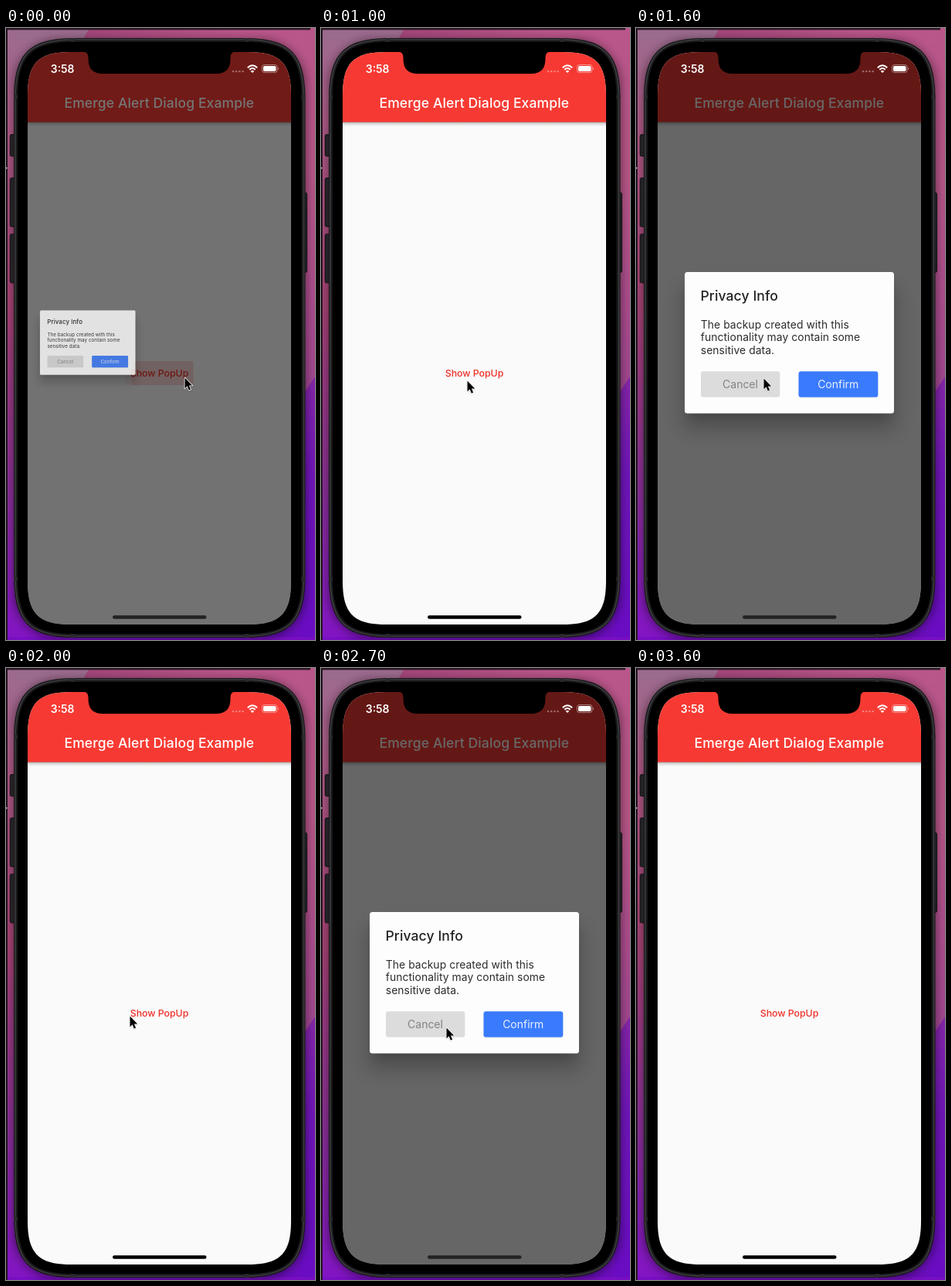
An HTML page for the animation above (4 s loop, 400 by 790 pixels).

```html
<!DOCTYPE html>
<html lang="en">
<head>
<meta charset="utf-8">
<title>Emerge Alert Dialog Example</title>
<style>
  html, body { margin: 0; width: 100%; height: 100%; overflow: hidden; background: #000; }
  svg { display: block; width: 400px; height: 790px; }
  text { font-family: Inter, Roboto, sans-serif; white-space: pre; }
  .title { font-size: 17.5px; font-weight: 500; letter-spacing: .13px; }
  .body { font-size: 13.8px; fill: #2b2b2b; letter-spacing: .1px; }
  .btn { font-size: 13.98px; text-anchor: middle; }
</style>
</head>
<body>
<svg viewBox="0 0 400 790">
  <defs>
    <linearGradient id="left" x2="0" y2="1">
      <stop offset="0" stop-color="#9a6c8e"/>
      <stop offset=".15" stop-color="#ad5a86"/>
      <stop offset=".45" stop-color="#a54373"/>
      <stop offset=".75" stop-color="#8a2f96"/>
      <stop offset="1" stop-color="#8214c4"/>
    </linearGradient>
    <linearGradient id="right" x2="0" y2="1">
      <stop offset="0" stop-color="#b9568a"/>
      <stop offset=".25" stop-color="#b45586"/>
      <stop offset=".6" stop-color="#a04690"/>
      <stop offset="1" stop-color="#6a0cc0"/>
    </linearGradient>
    <linearGradient id="top">
      <stop offset="0" stop-color="#a04478"/>
      <stop offset="1" stop-color="#b9568a"/>
    </linearGradient>
    <linearGradient id="purple" x2="0" y2="1">
      <stop offset="0" stop-color="#8526a8"/>
      <stop offset=".35" stop-color="#7016b8"/>
      <stop offset="1" stop-color="#690cc4"/>
    </linearGradient>
    <linearGradient id="barShadow" x2="0" y2="1">
      <stop offset="0" stop-opacity=".36"/>
      <stop offset=".4" stop-opacity=".14"/>
      <stop offset="1" stop-opacity="0"/>
    </linearGradient>
    <filter id="soft" x="-40%" y="-40%" width="180%" height="180%"><feGaussianBlur stdDeviation="13"/></filter>
    <filter id="tight" x="-20%" y="-20%" width="140%" height="140%"><feGaussianBlur stdDeviation="6"/></filter>
    <filter id="small" x="-50%" y="-50%" width="200%" height="200%"><feGaussianBlur stdDeviation="1"/></filter>
    <clipPath id="screen"><path id="screenShape"/></clipPath>
    <clipPath id="showBox"><rect x="155" y="430" width="87.5" height="31" rx="3"/></clipPath>
    <clipPath id="cancelBox"><rect x="84" y="443.3" width="102.3" height="33.3" rx="3"/></clipPath>
  </defs>

  <!-- Desktop -->
  <rect width="200" height="790" fill="url(#left)"/>
  <rect x="200" width="200" height="790" fill="url(#right)"/>
  <path d="M108 0H300V60H75Z" fill="url(#top)"/>
  <path d="M400 450V790H380V480Z" fill="url(#purple)"/>
  <rect y="786" width="400" height="4" fill="#780fc2"/>
  <rect x="9" y="14" width="380" height="776" rx="60" filter="url(#tight)" opacity=".4"/>
  <rect width="394" height="2.5" fill="#2b1824"/>
  <rect width="2" height="790" fill="#20121f"/>
  <rect y="180" width="1.5" height="1.500" fill="#ddd"/>

  <!-- Phone -->
  <g fill="#242226" stroke="#111" stroke-width="1">
    <rect x="5.300" y="137.500" width="7" height="28" rx="2"/>
    <rect x="5.300" y="193.500" width="7" height="63" rx="2"/>
    <rect x="5.300" y="266" width="7" height="63" rx="2"/>
    <rect x="383" y="212.500" width="6.500" height="103" rx="2"/>
  </g>
  <path id="body" fill="#19191b"/>
  <path id="rim" fill="none" stroke="#3e3d40" stroke-width="1.500"/>
  <path id="bezel"/>
  <path d="M10 89H15M382.500 89H387.500M10 711H15M382.500 711H387.500M86 13V18M312 13V18M86 782V787M312 782V787" stroke="#29292b" stroke-width="5"/>

  <!-- App -->
  <g clip-path="url(#screen)">
    <rect x="28" y="31" width="341" height="739" fill="#fafafa"/>
    <rect x="28" y="121" width="341" height="6" fill="url(#barShadow)"/>
    <rect x="28" y="31" width="341" height="90.500" fill="#f63a33"/>
    <text class="title" x="198.300" y="103" text-anchor="middle" fill="#fff">Emerge Alert Dialog Example</text>
    <g clip-path="url(#showBox)">
      <g id="showPress" fill="#f63a33">
        <rect x="155" y="430" width="88" height="31" fill-opacity=".06"/>
        <circle id="showSplash" r="69" fill-opacity=".14"/>
      </g>
    </g>
    <text x="198.500" y="449.700" text-anchor="middle" font-size="12.300" font-weight="500" fill="#ee3029">Show PopUp</text>
    <rect id="barrier" x="28" y="31" width="341" height="739"/>

    <g id="dialog">
      <rect x="60" y="334" width="277" height="185" rx="8" filter="url(#soft)" opacity=".22"/>
      <rect x="69" y="327" width="259" height="174" rx="6" filter="url(#tight)" opacity=".14"/>
      <rect x="63" y="315" width="271" height="182.500" rx="3.500" fill="#fdfdfd"/>
      <text class="title" x="83.500" y="352.300" fill="#222">Privacy Info</text>
      <text class="body" x="83.800" y="387.700">The backup created with this</text>
      <text class="body" x="83.800" y="404.200">functionality may contain some</text>
      <text class="body" x="83.800" y="420.800">sensitive data.</text>
      <rect x="84" y="443.300" width="102.300" height="33.300" rx="3" fill="#dcdcdc"/>
      <g clip-path="url(#cancelBox)">
        <g id="cancelPress">
          <rect x="84" y="443" width="103" height="34" fill-opacity=".03"/>
          <circle id="cancelSplash" r="18" fill-opacity=".07"/>
        </g>
      </g>
      <text class="btn" x="135" y="465" fill="#838383">Cancel</text>
      <rect x="210.500" y="443.800" width="102.800" height="33.500" rx="3" opacity=".12"/>
      <rect x="210.500" y="443.300" width="102.800" height="33.300" rx="3" fill="#3a7bfd"/>
      <text class="btn" x="261.700" y="465" fill="#eaf0ff">Confirm</text>
    </g>
    <rect id="home" x="138" y="758.300" width="121.500" height="4.500" rx="2.250"/>
  </g>

  <!-- Notch and status -->
  <path d="M100 30.500Q106.500 31 106.500 38V40Q106.500 59 125 59H272Q290.500 59 290.500 40V38Q290.500 31 297 30.500Z"/>
  <g fill="#fff">
    <text x="57.800" y="57.700" font-size="13.900" font-weight="600">3:58</text>
    <g opacity=".35">
      <circle cx="294" cy="56" r="1.300"/><circle cx="298.200" cy="56" r="1.300"/>
      <circle cx="302.400" cy="56" r="1.300"/><circle cx="306.600" cy="56" r="1.300"/>
    </g>
    <path d="M312.800 51.200Q319 45.200 325.200 51.200M315.300 53.800Q319 50.200 322.700 53.800" fill="none" stroke="#fff" stroke-width="2"/>
    <path d="M319 58L316.700 55.700Q319 53.800 321.300 55.700Z"/>
    <rect x="331.500" y="47.500" width="19.500" height="10" rx="3" fill="none" stroke="#fff" stroke-opacity=".45"/>
    <rect x="333" y="49" width="16.500" height="7" rx="1.700"/>
    <path d="M352 50.800Q354 52.500 352 54.200Z" opacity=".5"/>
  </g>

  <g id="cursor">
    <path d="M.5 1.500V15.300L3.600 12.300 5.800 17.500 8.100 16.500 5.900 11.500H10.200Z" filter="url(#small)" opacity=".3"/>
    <path d="M.5 .5V14.300L3.600 11.300 5.800 16.500 8.100 15.500 5.900 10.500H10.200Z" stroke="#fff" stroke-width="1.600" paint-order="stroke" stroke-linejoin="round"/>
  </g>
</svg>
<script>
  const LOOP = 4000, STEP = 100;
  const $ = id => document.getElementById(id);

  // Box with continuous corners, which start turning earlier than an arc.
  function smoothBox(id, x, y, w, h, r) {
    const e = 1.35 * r, c = .33 * r, X = x + w, Y = y + h;
    $(id).setAttribute('d', `M${x + e} ${y}H${X - e}
      C${X - c} ${y} ${X} ${y + c} ${X} ${y + e}V${Y - e}
      C${X} ${Y - c} ${X - c} ${Y} ${X - e} ${Y}H${x + e}
      C${x + c} ${Y} ${x} ${Y - c} ${x} ${Y - e}V${y + e}
      C${x} ${y + c} ${x + c} ${y} ${x + e} ${y}Z`);
  }
  smoothBox('screenShape', 28, 31, 341, 739, 42);
  smoothBox('body', 10, 13, 377.5, 774, 59);
  smoothBox('rim', 12, 15, 373.5, 770, 57);
  smoothBox('bezel', 15, 18, 367.5, 764, 54);

  // time, progress of the dialog
  const openKeys = [
    [0, .63], [100, 1], [800, 1], [900, .55], [1000, 0],
    [1300, 0], [1400, .63], [1500, 1], [1700, 1], [1800, .55], [1900, 0],
    [2400, 0], [2500, .63], [2600, 1], [2900, 1], [3000, .55], [3100, 0]
  ];
  // time, x, y
  const cursorKeys = [
    [0, 231, 451], [100, 231, 451], [600, 178, 456], [800, 178, 456],
    [1000, 189, 455], [1300, 189, 453], [1600, 165, 452], [1800, 165, 452],
    [2000, 160, 449], [2400, 165, 449], [2700, 162, 464], [3300, 162, 464]
  ];
  const showTimes = [0, 1300, 1400, 2400, 2500];
  const cancelTimes = [800, 900, 1700, 1800, 2900, 3000];

  function sample(keys, t) {
    const i = keys.findIndex(k => k[0] > t);
    if (i < 0) return keys[keys.length - 1].slice(1);
    const a = keys[i - 1], b = keys[i];
    const p = (t - a[0]) / (b[0] - a[0]);
    return a.slice(1).map((v, n) => v + (b[n + 1] - v) * p);
  }

  const easeOut = (v, power) => 1 - Math.pow(1 - v, power);

  function press(name, on, x, y) {
    $(name + 'Press').setAttribute('opacity', on ? 1 : 0);
    $(name + 'Splash').setAttribute('cx', x);
    $(name + 'Splash').setAttribute('cy', y);
  }

  function draw(t) {
    const [v] = sample(openKeys, t);
    const [x, y] = sample(cursorKeys, t);
    const s = Math.pow(v, 1.7);

    // The dialog grows out of the middle of the left screen edge.
    $('dialog').setAttribute('transform', `translate(28 406.2) scale(${s}) translate(-28 -406.2)`);
    $('dialog').setAttribute('opacity', easeOut(v, 1.67));
    $('dialog').setAttribute('visibility', v > 0 ? 'visible' : 'hidden');
    $('barrier').setAttribute('opacity', .592 * easeOut(v, 2.5));
    $('home').setAttribute('fill', v > 0 ? '#222' : '#000');

    press('show', showTimes.includes(t), x, y);
    press('cancel', cancelTimes.includes(t), x, y + 2);

    $('cursor').setAttribute('transform', `translate(${x} ${y})`);
    $('cursor').setAttribute('visibility', t < 3400 ? 'visible' : 'hidden');
  }

  const start = performance.now();
  function tick() {
    const t = (performance.now() - start) % LOOP;
    draw(Math.floor(t / STEP) * STEP);
    requestAnimationFrame(tick);
  }
  tick();
</script>
</body>
</html>
```
